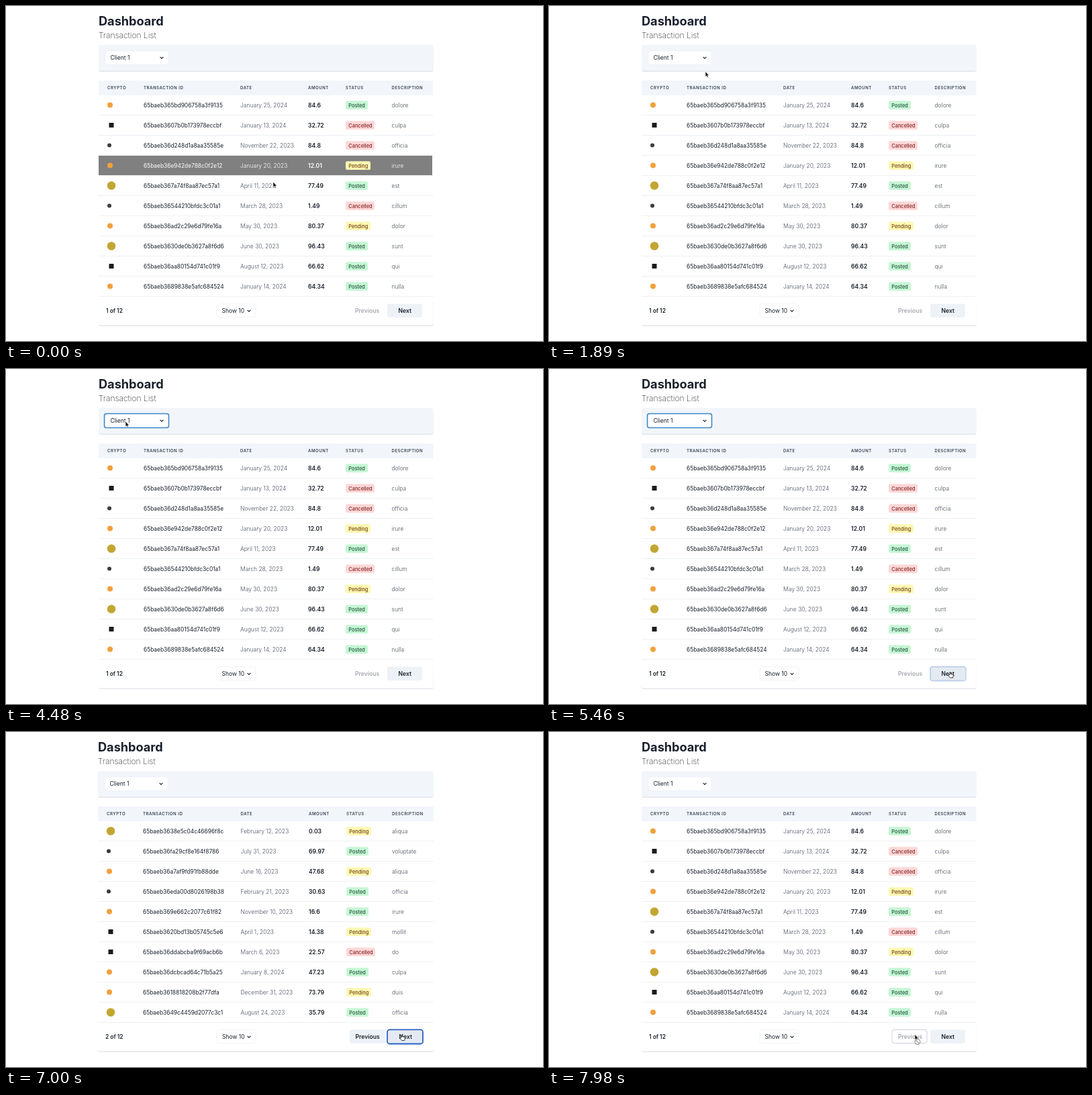
An HTML page that plays this animation: 800 by 499 pixels, repeating every 8 s.

```html
<!DOCTYPE html>
<html lang="en">
<head>
<meta charset="utf-8">
<title>Dashboard</title>
<style>
html, body { margin: 0; width: 100%; height: 100%; overflow: hidden; background: #fff; }
svg { display: block; width: 100%; height: 100%; font: 8.5px Inter, sans-serif; fill: #1a202c; }
.title { font-size: 18.15px; font-weight: 700; }
.sub { font-size: 12px; font-weight: 200; fill: #333; }
.head { font-size: 6.1px; font-weight: 600; letter-spacing: .5px; fill: #3b4452; }
.id { font-size: 8.4px; }
.thin { font-weight: 300; fill: #4a5160; }
.bold { font-weight: 600; font-size: 8.6px; }
.pill { font-size: 7.4px; font-weight: 500; }
.hot text:not(.pill) { fill: #fff; }
</style>
</head>
<body>
<svg id="stage" viewBox="0 0 800 499" xmlns="http://www.w3.org/2000/svg"></svg>
<script>
const stage = document.getElementById('stage');
const LOOP = 8000;
const PAGE2 = 6400, PAGE1 = 7700;

const logos = {
  b: ['circle', 155, 4, '#f2a03f'],
  s: ['square', 157, 3.5, '#1b1b1b'],
  e: ['circle', 154, 3, '#3c3c3d'],
  d: ['circle', 157, 6.3, '#c2a633']
};
const states = {
  Posted: [33, '#c6f6d5', '#22543d'],
  Pending: [37, '#fdf8b4', '#744210'],
  Cancelled: [43, '#fed7d7', '#822727']
};
const heads = ['CRYPTO', 'TRANSACTION ID', 'DATE', 'AMOUNT', 'STATUS', 'DESCRIPTION'];

const pages = [{
  left: 138, right: 636.5, cols: [151, 205, 349, 450, 506, 574.5], nav: 568, label: '1 of 12',
  rows: `b 65baeb365bd906758a3f9135|January 25, 2024|84.6|Posted|dolore
s 65baeb3607b0b173978eccbf|January 13, 2024|32.72|Cancelled|culpa
e 65baeb36d248d1a8aa35585e|November 22, 2023|84.8|Cancelled|officia
b 65baeb36e942de788c0f2e12|January 20, 2023|12.01|Pending|irure
d 65baeb367a74f8aa87ec57a1|April 11, 2023|77.49|Posted|est
e 65baeb36544210bfdc3c01a1|March 28, 2023|1.49|Cancelled|cillum
b 65baeb36ad2c29e6d79fe16a|May 30, 2023|80.37|Pending|dolor
d 65baeb3630de0b3627a8f6d6|June 30, 2023|96.43|Posted|sunt
s 65baeb36aa80154d741c01f9|August 12, 2023|66.62|Posted|qui
b 65baeb3689838e5afc684524|January 14, 2024|64.34|Posted|nulla`
}, {
  left: 137, right: 637, cols: [150, 204, 349.5, 451, 507, 575], nav: 569, label: '2 of 12',
  rows: `d 65baeb3638e5c04c46696f8c|February 12, 2023|0.03|Pending|aliqua
e 65baeb36fa29cf8e164f8786|July 31, 2023|69.97|Posted|voluptate
b 65baeb36a7af9fd91fb88dde|June 16, 2023|47.68|Pending|aliqua
e 65baeb36eda00d8026198b38|February 21, 2023|30.63|Posted|officia
b 65baeb369e662c2077c61f82|November 10, 2023|16.6|Posted|irure
s 65baeb3620bd13b05745c5e6|April 1, 2023|14.38|Pending|mollit
s 65baeb36ddabcba9f69acb6b|March 6, 2023|22.57|Cancelled|do
b 65baeb36dcbcad64c71b5a25|January 8, 2024|47.23|Posted|culpa
b 65baeb3618818208b2f77dfa|December 31, 2023|73.79|Pending|duis
d 65baeb3649c4459d2077c3c1|August 24, 2023|35.79|Posted|officia`
}];

const text = (x, y, s, cls = '', more = '') => `<text x="${x}" y="${y}" class="${cls}" ${more}>${s}</text>`;
const box = (x, y, w, h, fill, more = '') =>
  `<rect x="${x}" y="${y}" width="${w}" height="${h}" fill="${fill}" ${more}/>`;
const chevron = (x, y) =>
  `<path d="M${x - 2.4} ${y - 1.2}l2.4 2.4l2.4 -2.4" fill="none" stroke="#1a202c" stroke-width="1.2"/>`;

function logo(kind, dx, y) {
  const [shape, x, r, fill] = logos[kind];
  return shape === 'circle' ? `<circle cx="${x + dx}" cy="${y}" r="${r}" fill="${fill}"/>`
    : box(x + dx - r, y - r, r * 2, r * 2, fill);
}

function row(line, cols, y) {
  const [id, date, amount, state, note] = line.slice(2).split('|');
  const [w, fill, ink] = states[state];
  return logo(line[0], cols[0] - 151, y - .5) + text(cols[1], y + 3, id, 'id') +
    text(cols[2], y + 3, date, 'thin') + text(cols[3], y + 3, amount, 'bold') +
    box(cols[4], y - 6.8, w, 12.9, fill, 'rx="2.5"') +
    text(cols[4] + 4.3, y + 2.5, state, 'pill', `style="fill:${ink}"`) +
    text(cols[5], y + 3, note, 'thin');
}

function page({ left, right, cols, nav, label, rows }, n) {
  const w = right - left, lines = rows.split('\n');
  let s = text(left, 29, 'Dashboard', 'title') + text(left, 48.3, 'Transaction List', 'sub');
  s += box(left, 60, w, 38, '#e3e6eb', 'rx="3"') + box(left, 58, w, 38.5, '#f2f6fb', 'rx="3"');
  s += box(left + 10, 67, 94, 20.5, '#fff', 'rx="3" stroke="#e8edf3" stroke-width=".6"');
  s += text(left + 17.5, 80, 'Client 1') + chevron(left + 94, 77);
  s += box(left, 440, w, 37, '#e3e6eb', 'rx="3"') + box(left, 111, w, 364.5, '#fff', 'rx="3"');
  s += box(left, 111, w, 22, '#f2f6fb');
  heads.forEach((h, i) => s += text(cols[i], 124, h, 'head'));
  lines.forEach((line, i) => {
    const y = 148 + 30 * i;
    s += box(left, y + 14.2, w, .7, '#e6ebf1') + row(line, cols, y);
  });
  if (!n) s += `<g id="hover" class="hot">${box(138, 223, 497, 29, '#808080')}${row(lines[3], cols, 238)}</g>`;
  s += text(left + 11, 457, label, 'bold', 'style="font-size:8.4px"');
  s += box(314, 443.5, 58, 20, '#fff', 'rx="3" stroke="#edf0f4" stroke-width=".7"');
  s += text(321.5 + n / 2, 457, 'Show 10') + chevron(362, 454);
  if (n) s += box(nav - 57, 443.5, 52.5, 20.5, '#edf2f7', 'rx="3"');
  else s += box(511, 443.5, 52, 20, '#fff', 'id="prev" rx="3" stroke="#cbd0da"');
  s += text(520 + n / 2, 457, 'Previous', 'bold', n ? '' : 'style="fill:#a5a8ae"');
  s += box(nav, 443.5, 52, 20.5, '#edf2f7', 'rx="3" class="next"');
  s += text(nav + 16.5, 457, 'Next', 'bold');
  return `<g id="page${n}">${s}</g>`;
}

stage.innerHTML = pages.map(page).join('') +
  box(146.5, 66.5, 96, 21, 'none', 'id="focus" rx="3" stroke="#3b86c8" stroke-width="1.5"') +
  box(568, 443.3, 53, 21.2, 'none', 'id="ring" rx="3.5" stroke="#2a62c4" stroke-width="1.8"') +
  `<g id="cursor" stroke-linejoin="round">
    <path id="arrow" d="M0 0v8l1.8-1.6 1.3 2.7 1.3-.6-1.2-2.6h2.3z" fill="#111" stroke="#fff" stroke-width=".6"/>
    <path id="hand" d="M-.8 3.9V.4q.8-.9 1.5 0v2.4l3 .7q.7.3.6 1.2l-.7 3.8h-4L-3 5.2q-.2-1.2.9-1z" fill="#fff" stroke="#111" stroke-width=".8"/>
    <g id="ban" fill="#fff" stroke="#999" stroke-width="1.2"><circle cx="4" cy="11" r="3.9"/><path d="M1.3 8.3l5.4 5.4"/></g>
  </g>`;

// time, x, y of the pointer's tip
const path = [[0, 398, 262], [420, 398, 262], [490, 397, 261], [560, 397, 261], [770, 330, 185],
  [980, 330, 185], [1260, 231, 95], [1820, 231, 95], [1890, 233, 97.5], [2100, 233, 97.5],
  [2310, 420, 250], [3080, 420, 250], [3430, 433, 261.5], [3850, 433, 261.5], [4480, 178, 78],
  [4830, 178, 78], [5040, 590, 450], [5250, 590, 450], [5460, 598, 451.5], [6370, 598, 451.5],
  [7000, 590, 451], [7210, 590, 451], [7560, 541, 451], [7700, 541, 451], [7980, 545, 450.5],
  [LOOP, 545, 450.5]];

const $ = id => document.getElementById(id);
const show = (id, on) => $(id).style.opacity = +on;
const ramp = (t, a, b) => Math.min(1, Math.max(0, (t - a) / (b - a)));
const within = (t, a, b) => t >= a && t < b;

function draw(t) {
  const second = within(t, PAGE2, PAGE1);
  $('page0').style.display = second ? 'none' : '';
  $('page1').style.display = second ? '' : 'none';
  show('hover', 1 - ramp(t, 60, 210));
  show('prev', t >= PAGE1);
  show('focus', within(t, 4400, 5530));
  show('ring', t < PAGE1 ? ramp(t, 5410, 5600) : 0);
  const over = within(t, 5040, 7300);
  document.querySelectorAll('.next').forEach(e => e.setAttribute('fill', over ? '#e4eaf1' : '#edf2f7'));

  const i = path.findIndex(p => p[0] > t);
  const [t0, x0, y0] = path[i - 1], [t1, x1, y1] = path[i];
  const k = ramp(t, t0, t1), e = k * k * (3 - 2 * k);
  $('cursor').setAttribute('transform', `translate(${x0 + (x1 - x0) * e} ${y0 + (y1 - y0) * e})`);
  const hand = within(t, 5040, PAGE1);
  show('hand', hand);
  show('arrow', !hand);
  show('ban', t >= PAGE1 + 140);
}

const start = performance.now();
function tick() {
  draw((performance.now() - start) % LOOP);
  requestAnimationFrame(tick);
}
tick();
</script>
</body>
</html>
```
